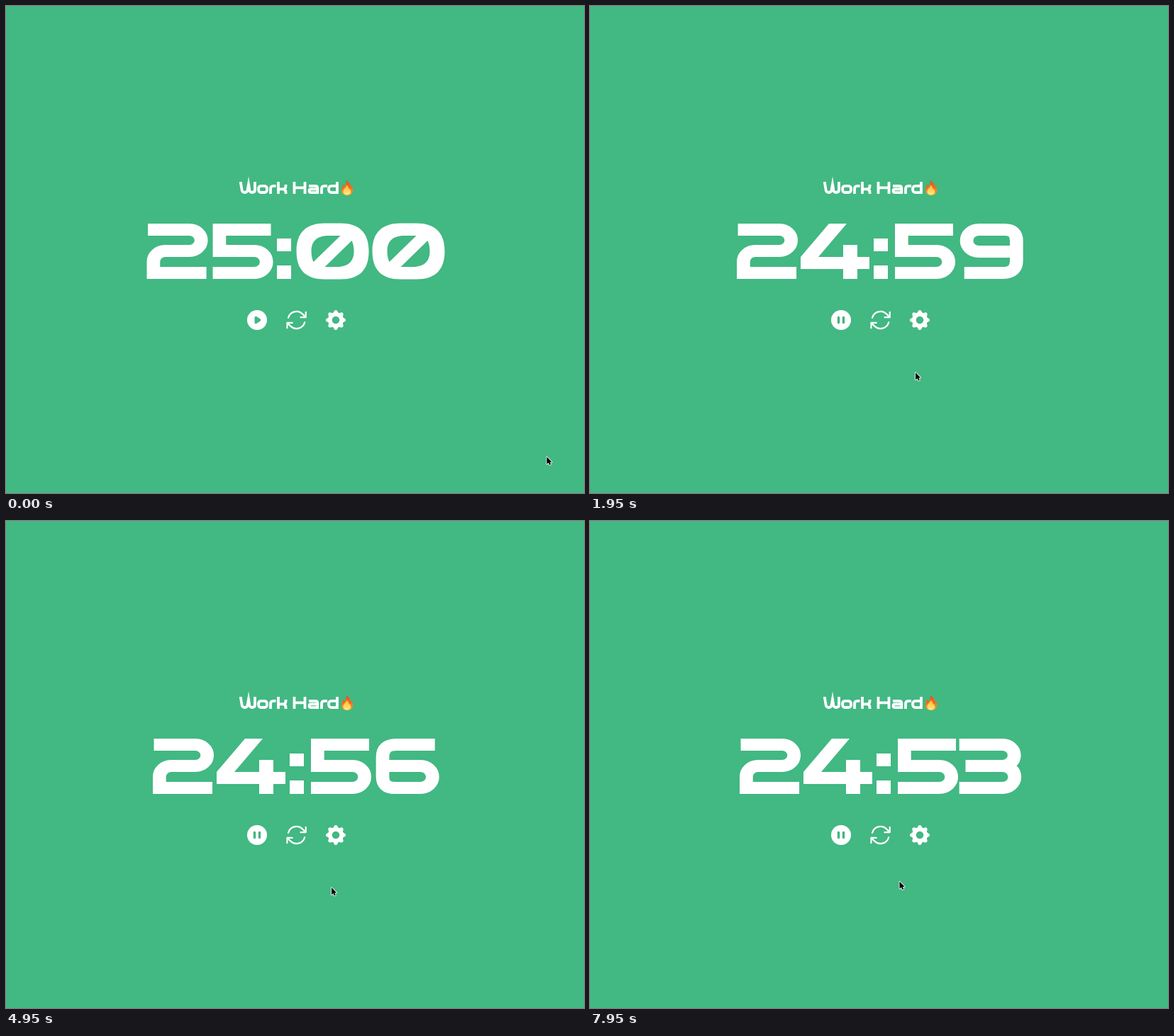
Recreate the animation shown at these times as an HTML page with a canvas. Size 815 by 687 pixels, loop 8 s.

```html
<!DOCTYPE html>
<html lang="en">
<head>
<meta charset="utf-8">
<title>Work timer</title>
<style>
html, body { margin: 0; width: 100%; height: 100%; overflow: hidden; background: #42b883; }
canvas { display: block; }
</style>
</head>
<body>
<canvas id="stage" width="815" height="687" role="img" aria-label="Work Hard 🔥 25:00"></canvas>
<script>
const ctx = document.getElementById('stage').getContext('2d');
const GREEN = '#42b883', WHITE = '#fff', SLATE = '#64748b';
const LOOP = 8000, STEP = 50;

// Pen digits are drawn with one wide, horizontally stretched stroke.
const PEN_STRETCH = 1.1, PEN_WIDTH = 17;
const pen = (left, advance, d) => ({ left, advance, path: new Path2D(d), pen: true });
const solid = (left, advance, d) => ({ left, advance, path: new Path2D(d) });

const glyphs = {
  0: solid(1.5, 107,
    'M0 39C0 12 14-.5 40-.5H62C88-.5 102 12 102 39C102 66 88 78.5 62 78.5H40C14 78.5 0 66 0 39Z' +
    'M21 39C21 23 31 17 45 17H62L24 54Q21 48 21 39Z' +
    'M81 39C81 55 71 61 57 61H40L78 24Q81 30 81 39Z'),
  2: pen(2, 91, 'M1.4 8.5H54.7a15 15 0 0 1 0 30H23.5a15 15 0 0 0-15 15V69.5H76.4'),
  3: pen(-1, 87.9, 'M0 8.5H55.5a15 15 0 0 1 0 30H8M55.5 38.5a15.5 15.5 0 0 1 0 31H0'),
  4: solid(1, 101.2, 'M40 0H65L25 47H60V30H80V47H97V64H80V78H60V64H0V47Z'),
  5: pen(4, 91.7, 'M74.5 8.5H8.5V38.5H53.3a15.5 15.5 0 0 1 0 31H0'),
  6: pen(4, 95.9, 'M75.5 8.5H26Q8.5 8.5 8.5 26V54Q8.5 69.5 24 69.5H57a15.5 15.5 0 0 0 0-31H8.5'),
  7: solid(-1, 87.9, 'M0 0H89V16L38 78H13L62 17H0Z'),
  8: pen(4, 103.9, 'M24 38.5H61a15.5 15.5 0 0 1 0 31H24a15.5 15.5 0 0 1 0-31Z' +
    'M25.7 38.5a15 15 0 0 1 0-30H59.3a15 15 0 0 1 0 30'),
  9: pen(4, 95.9, 'M72.4 39.5H24a15.5 15.5 0 0 1 0-31H57Q72.4 8.5 72.4 24V52Q72.4 69.5 55 69.5H5.5'),
  ':': solid(2.8, 28.8, 'M0 21H20V39H0ZM0 59H20V78H0Z'),
};

const letters = [
  'M330.7 248L332.6 259.5Q333.2 263 336.5 263Q339.8 263 340.5 260L342 251.5' +
    'L343.4 260Q344 263 347 263Q351 263 351 259V248',
  'M359.5 253.8H364.5Q368 253.8 368 258.4Q368 263 364.5 263H359.5Q356 263 356 258.4Q356 253.8 359.5 253.8Z',
  'M373 265V258Q373 253.8 377 253.8H380.5',
  'M384 248V265M384 258.4H390Q394.5 258.4 394.5 254V252M390 258.4Q394.5 258.4 394.5 262.5V265',
  'M406.5 248V265M421.5 248V265M406.5 256.4H421.5',
  'M427 253.8H436Q439.3 253.8 439.3 257V263.1H430Q427.6 263.1 427.6 260.7Q427.6 258.4 430 258.4H439.3',
  'M445 265V258Q445 253.8 449 253.8H453',
  'M467 248V263.1H459Q455 263.1 455 258.5Q455 253.8 459 253.8H467',
].map(d => new Path2D(d));

const flame = new Path2D('M481 267C475.5 267 472.7 263.5 473 259C473.3 255.5 475 254 475.4 251.5' +
  'C476.6 252.5 477 254 477 255.5C479 253 480.3 250 479.5 246C483.5 248 486 251.5 486 255' +
  'C486.8 254.5 487 253.5 487 252.5C489 255.5 489.5 258 489.2 260C488.6 264.5 486 267 481 267Z');
const flameCore = new Path2D('M481 266.5C477 266.5 475 264 475.6 260.5C476.2 258 479 256.5 480.5 252.5' +
  'C483 255 483.6 257.5 484 259.5L485.3 258C487.4 262.5 485.5 266.5 481 266.5Z');
const flameFill = ctx.createLinearGradient(0, 246, 0, 267);
flameFill.addColorStop(0, '#e2501c');
flameFill.addColorStop(0.55, '#f5711d');
flameFill.addColorStop(1, '#ffa928');
const coreFill = ctx.createLinearGradient(0, 253, 0, 267);
coreFill.addColorStop(0, '#ffb52e');
coreFill.addColorStop(1, '#fff08a');

// Icons live on a 20 unit grid centred on the origin.
const ICON_SCALE = 1.75;
const playMark = new Path2D('M-.445-2.832A1 1 0 0 0-2-2v4a1 1 0 0 0 1.555.832l3-2a1 1 0 0 0 0-1.664Z');
const pauseMark = new Path2D('M-3-2a1 1 0 0 1 2 0v4a1 1 0 0 1-2 0ZM1-2a1 1 0 0 1 2 0v4a1 1 0 0 1-2 0Z');
const tooth = new Path2D('M0 0L-1.49-6.83c.38-1.56 2.6-1.56 2.98 0a1.532 1.532 0 0 0 2.287.948Z');
const gear = new Path2D();
for (let i = 0; i < 8; i++) gear.addPath(tooth, new DOMMatrix().rotate(i * 45));

const refresh = new Path2D('M16.02 9.35h4.99v-4.99M2.99 19.64v-4.99h4.99' +
  'M2.99 14.65l3.18 3.18a8.25 8.25 0 0 0 13.8-3.7M4.03 9.87a8.25 8.25 0 0 1 13.8-3.7l3.18 3.18');
const arrow = new Path2D('M0 0V10.3L2.4 8.2L4 11.6L5.8 10.8L4.3 7.4H7.3Z');
const hand = new Path2D('M-1.1 1Q0-.8 1.1 1L1.8 4L5 4.8Q6.7 5.4 6.3 7.5L5.3 11.2H.2' +
  'L-3.2 7.4Q-3.4 5.8-1.6 6.3L-.2 7Z');

// Pointer stops: time, x, y
const stops = [
  [0, 762.5, 636], [700, 355.5, 457.5], [900, 355.5, 457.5], [1200, 567, 503],
  [1500, 459, 517], [7400, 459, 517], [7950, 436.5, 508.5],
];
const ease = u => u * u * (3 - 2 * u);

function pointerAt(t) {
  const next = stops.findIndex(s => s[0] > t);
  if (next < 0) return stops.at(-1).slice(1);
  const [t0, x0, y0] = stops[next - 1], [t1, x1, y1] = stops[next];
  const u = ease((t - t0) / (t1 - t0));
  return [x0 + (x1 - x0) * u, y0 + (y1 - y0) * u];
}

function at(x, y, draw, scale = 1) {
  ctx.save();
  ctx.translate(x, y);
  ctx.scale(scale, scale);
  draw();
  ctx.restore();
}

function stroke(path, color, width) {
  ctx.strokeStyle = color;
  ctx.lineWidth = width;
  ctx.stroke(path);
}

function fill(path, color, rule = 'nonzero') {
  ctx.fillStyle = color;
  ctx.fill(path, rule);
}

function disc(x, y, r) {
  const path = new Path2D();
  path.arc(x, y, r, 0, Math.PI * 2);
  return path;
}

function drawTitle() {
  letters.forEach(path => stroke(path, WHITE, 3.8));
  fill(flame, flameFill);
  fill(flameCore, coreFill);
}

function drawClock(seconds) {
  const two = n => String(n).padStart(2, '0');
  const chars = [...`${two(Math.floor(seconds / 60))}:${two(seconds % 60)}`];
  const width = chars.reduce((sum, c) => sum + glyphs[c].advance, 0);
  let x = 409.3 - width / 2;
  for (const c of chars) {
    const g = glyphs[c];
    at(x + g.left, 307, () => {
      if (g.pen) {
        ctx.scale(PEN_STRETCH, 1);
        stroke(g.path, WHITE, PEN_WIDTH);
      } else {
        fill(g.path, WHITE, 'evenodd');
      }
    });
    x += g.advance;
  }
}

function drawToggle(running, hovered) {
  at(354, 443, () => {
    fill(disc(0, 0, 8), hovered ? SLATE : WHITE);
    fill(running ? pauseMark : playMark, GREEN);
  }, ICON_SCALE);
}

function drawRefresh() {
  at(409.6, 443, () => {
    ctx.translate(-12, -12);
    ctx.lineCap = ctx.lineJoin = 'round';
    stroke(refresh, WHITE, 1.5);
  }, 1.458);
}

function drawGear() {
  at(465, 443, () => {
    fill(gear, WHITE);
    fill(disc(0, 0, 3), GREEN);
  }, ICON_SCALE);
}

function drawPointer(x, y, hovered, pressed) {
  if (pressed) {
    const ring = disc(355.5, 456.8, 19.7);
    stroke(ring, WHITE, 4.4);
    stroke(ring, '#000', 2.4);
  }
  at(x, y, () => {
    ctx.lineJoin = 'round';
    if (hovered) {
      stroke(hand, '#000', 1.8);
      fill(hand, WHITE);
    } else {
      stroke(arrow, WHITE, 1.6);
      fill(arrow, '#000');
    }
  });
}

function draw(t) {
  const [x, y] = pointerAt(t);
  const hovered = Math.abs(x - 354) < 17 && Math.abs(y - 443) < 17;
  const elapsed = Math.max(0, Math.floor((t - 950) / 1000));
  ctx.fillStyle = GREEN;
  ctx.fillRect(0, 0, 815, 687);
  drawTitle();
  drawClock(25 * 60 - elapsed);
  drawToggle(t >= 900, hovered);
  drawRefresh();
  drawGear();
  drawPointer(x, y, hovered, t >= 750 && t <= 900);
}

function tick() {
  draw(Math.floor(performance.now() % LOOP / STEP) * STEP);
  requestAnimationFrame(tick);
}
tick();
</script>
</body>
</html>
```
